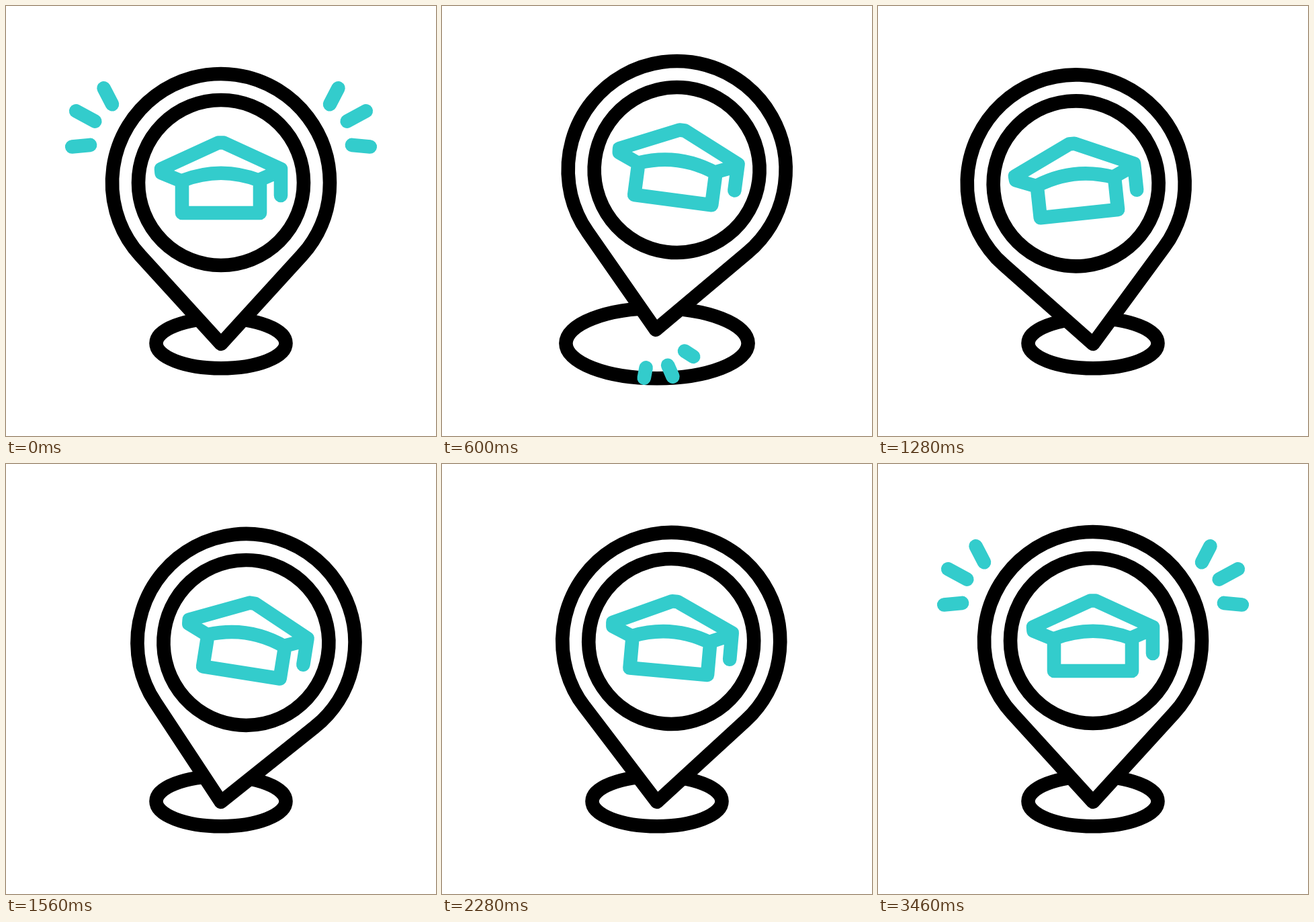
Recreate the animation shown at these times as an HTML page with a canvas. Size 640 by 640 pixels, loop 3.6 s.

```html
<!DOCTYPE html>
<html lang="en">
<head>
<meta charset="utf-8">
<title>School location pin</title>
<style>
  html, body { margin: 0; width: 100%; height: 100%; overflow: hidden; background: #fff; }
  canvas { display: block; width: 100vmin; height: 100vmin; }
</style>
</head>
<body>
<canvas id="stage" width="640" height="640"></canvas>
<script>
const ctx = document.getElementById('stage').getContext('2d');
const LOOP = 3600, STROKE = 20.6, TEAL = '#33cccc', RAD = Math.PI / 180;
const TIP = { x: 320, y: 502 };
const JUMP_PEAK = 375, LANDING = 700, HALF_SWING = 400;

// Eased 0 to 1 between two times, and a rise followed by a fall.
function ramp(t, from, to) {
  const u = Math.min(1, Math.max(0, (t - from) / (to - from)));
  return u * u * (3 - 2 * u);
}
const pulse = (t, start, peak, end) => ramp(t, start, peak) - ramp(t, peak, end);

// Furthest lean of each half swing: sides alternate, each pair is weaker.
function lean(n) {
  const size = [18.4, 10.3, 5.2][n >> 1] || 0;
  return n % 2 ? -size : size;
}

function pinAngle(t) {
  const windUp = -30.5;
  if (t < JUMP_PEAK) return windUp * ramp(t, 0, JUMP_PEAK);
  if (t < LANDING) return windUp + (lean(0) - windUp) * ramp(t, JUMP_PEAK, LANDING);
  const swing = (t - LANDING) / HALF_SWING, n = Math.floor(swing);
  return lean(n) + (lean(n + 1) - lean(n)) * ramp(swing, n, n + 1);
}

function stroke(color, draw) {
  ctx.beginPath();
  draw();
  ctx.strokeStyle = color;
  ctx.lineWidth = STROKE;
  ctx.stroke();
}

function polyline(...points) {
  points.forEach(([x, y], i) => i ? ctx.lineTo(x, y) : ctx.moveTo(x, y));
}

// Three bars radiating from a centre, the middle one longest.
function sparkFan(grow, x, y, angle, radius, flip = 1) {
  if (grow < 0.005) return;
  for (const side of [-1, 0, 1]) {
    const a = (angle + 34 * side) * RAD;
    const length = side ? 27 : 32;
    const point = r => [x + flip * r * Math.cos(a), y + r * Math.sin(a)];
    stroke(TEAL, () => polyline(point(radius), point(radius + length * grow)));
  }
}

function drawPin() {
  const spread = 0.645;
  stroke('#000', () => {
    ctx.moveTo(320, 503);
    ctx.lineTo(200, 371.5);
    ctx.arc(320, 263, 162, Math.PI - spread, spread);
    ctx.lineTo(440, 371.5);
    ctx.closePath();
    ctx.fillStyle = '#fff';
    ctx.fill();
  });
  stroke('#000', () => ctx.arc(320, 263, 123, 0, 7));
}

function drawCap() {
  stroke(TEAL, () => {
    polyline([262, 261], [231.5, 248.5], [231, 242.5], [316, 203.5], [324, 203.5], [409, 242.5], [409, 282]);
    polyline([409, 245], [378, 258.5]);
    polyline([262, 260], [262, 308], [378, 308], [378, 260]);
    ctx.quadraticCurveTo(320, 237.5, 262, 260);
  });
}

function render(t) {
  ctx.fillStyle = '#fff';
  ctx.fillRect(0, 0, 640, 640);
  ctx.lineCap = ctx.lineJoin = 'round';

  const ripple = 1 + 0.62 * pulse(t, 450, LANDING, 1100);
  stroke('#000', () => ctx.ellipse(TIP.x, TIP.y, 96.5 * ripple, 37.2 * ripple, 0, 0, 7));

  const sideGrow = 1 - ramp(t, 0, 200) + pulse(t, 2700, 2900, 3140) + ramp(t, 3250, 3460);
  sparkFan(sideGrow, 453.5, 201, -28.5, 61.7);
  sparkFan(sideGrow, 186.5, 201, -28.5, 61.7, -1);

  const jump = pulse(t, 0, JUMP_PEAK, LANDING);
  ctx.save();
  ctx.translate(TIP.x - 8 * jump, TIP.y - 95 * jump);
  ctx.rotate(pinAngle(t) * RAD);
  sparkFan(pulse(t, 480, LANDING, 900), -4, 3, 59, 56);
  ctx.translate(-TIP.x, -TIP.y);
  drawPin();
  drawCap();
  ctx.restore();
}

const start = performance.now();
function tick() {
  render((performance.now() - start) % LOOP);
  requestAnimationFrame(tick);
}
tick();
</script>
</body>
</html>
```
